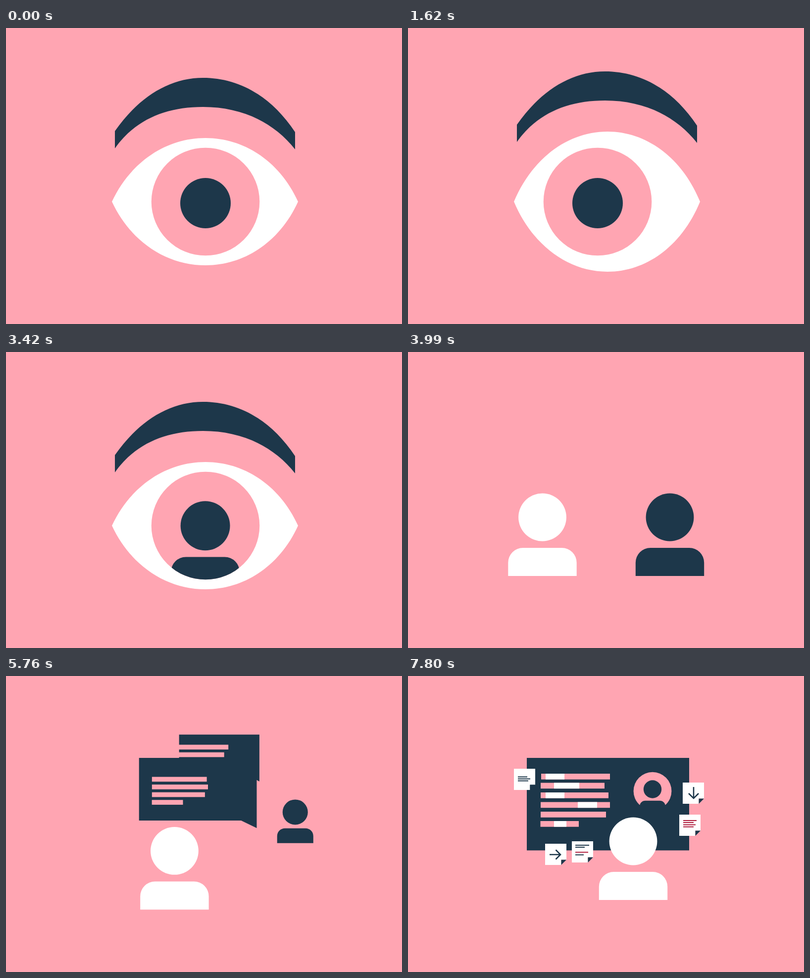
Recreate the animation shown at these times as an HTML page. Size 800 by 600 pixels, loop 8 s.

```html
<!DOCTYPE html>
<html lang="en">
<head>
<meta charset="utf-8">
<title>Eye, chat, profile</title>
<style>
  html, body { margin: 0; width: 100%; height: 100%; overflow: hidden; background: #ffa5b2; }
  svg { display: block; width: 100vw; height: 100vh; }
  .pink { fill: #ffa5b2; }
  .dark { fill: #1d374a; }
  .white { fill: #fff; }
  .ink { fill: none; stroke: #1d374a; stroke-width: 2; }
  .red { fill: none; stroke: #b01c3c; stroke-width: 2; }
  .arrow { stroke-width: 2.6; }
</style>
</head>
<body>
<svg viewBox="0 0 800 600">
  <defs>
    <clipPath id="lens"><circle id="lensCircle" cx="403" cy="352" r="109.3"/></clipPath>
    <g id="person">
      <circle r="48.4"/>
      <path d="M-69.2 119V92A30 30 0 0 1 -39.2 62H39.2A30 30 0 0 1 69.2 92V119Z"/>
    </g>
  </defs>
  <g id="eye">
    <path id="ball" class="white"/>
    <circle id="iris" class="pink" cy="352" r="109.3"/>
    <path id="brow" class="dark" d="M220 209C268 140 330 101 398 101S533 134 584 211V246C540 190 475 160 398 160S260 187 220 244Z"/>
  </g>
  <g id="pupil" class="dark" clip-path="url(#lens)">
    <circle id="head"/>
    <path id="torso" d="M-69.2 57V30A30 30 0 0 1 -39.2 0H39.2A30 30 0 0 1 69.2 30V57Z"/>
  </g>
  <g id="chat"></g>
  <g id="marks" class="white"></g>
  <circle id="badge" class="pink"/>
  <use id="guest" class="dark" href="#person"/>
  <use id="host" class="white" href="#person"/>
  <use id="twin" class="dark" href="#person"/>
  <g id="notes"></g>
</svg>
<script>
const LOOP = 8000;
const $ = id => document.getElementById(id);
const clamp = v => Math.min(1, Math.max(0, v));
const span = (t, a, b) => clamp((t - a) / (b - a));
const smooth = p => p * p * (3 - 2 * p);
const ease = (t, a, b) => smooth(span(t, a, b));
const out = p => 1 - (1 - p) ** 3;
const mix = (a, b, p) => a + (b - a) * p;
const back = (p, s) => 1 + (s + 1) * (p - 1) ** 3 + s * (p - 1) ** 2;

function add(parent, tag, attrs) {
  const el = document.createElementNS('http://www.w3.org/2000/svg', tag);
  set(el, attrs);
  return parent.appendChild(el);
}
function set(el, attrs) {
  for (const k in attrs) el.setAttribute(k, attrs[k]);
}
function show(el, on) {
  el.style.display = on ? '' : 'none';
}
function place(el, x, y, s = 1) {
  el.setAttribute('transform', `translate(${x} ${y}) scale(${s})`);
}
function scaleAt(el, x, y, s) {
  el.setAttribute('transform', `translate(${x} ${y}) scale(${s}) translate(${-x} ${-y})`);
}

// Bubble shapes: left, top, right, bottom, tail x, tail y
const bubbles = [
  { from: [286, 166, 469.5, 256.5, 436, 281], to: [240, 166, 568, 353.5, 540, 353.5], start: 4170, len: 330 },
  { from: [361.5, 85, 501, 143, 479, 162], to: [330, 175, 530, 300, 510, 300], start: 4650, len: 360 }
];
// Text bars: left, right, top before and after the merge
const bars = [
  { b: 1, from: [378, 474, 104], to: [269, 408, 198] },
  { b: 1, from: [378, 467, 117.5], to: [268, 397, 216.5] },
  { b: 0, from: [311, 406, 185.5], to: [268, 405, 236] },
  { b: 0, from: [311, 408, 198.7], to: [268, 408, 255.5] },
  { b: 0, from: [311, 403, 212], to: [268, 400, 275] },
  { b: 0, from: [311, 365, 225.5], to: [267.5, 345, 294] }
];
const marks = [[278, 316, 0], [295, 346, 1], [278, 316, 2], [343, 382, 3], [295, 320, 5]];
const notes = [
  { x: 214, y: 188, ink: 'M8 16.5h19M8 20.5h25M8 24.5h21' },
  { x: 555, y: 216, ink: 'M22 9v23M12 22l10 10 10-10', arrow: true },
  { x: 548, y: 281, red: 'M8 12h27M8 16h21M8 20.5h25M8 24.7h21' },
  { x: 331, y: 335, ink: 'M7 8h28M7 12h19M7 27.5h17', red: 'M7 22.3h26' },
  { x: 277, y: 340, ink: 'M9 22h22M21.5 12.5l9.5 9.5-9.5 9.5', arrow: true }
];

for (const b of bubbles) b.el = add($('chat'), 'path', { class: 'dark' });
for (const b of bars) b.el = add($('chat'), 'rect', { class: 'pink' });
for (const m of marks) m.el = add($('marks'), 'rect', { x: m[0], y: bars[m[2]].to[2], height: 11.7 });
for (const n of notes) {
  n.el = add($('notes'), 'g', {});
  add(n.el, 'path', { class: 'white', d: 'M0 0H43V32.5H32.5V43H0Z' });
  add(n.el, 'path', { class: 'dark', d: 'M32.5 32.5H43L32.5 43Z' });
  if (n.ink) add(n.el, 'path', { class: n.arrow ? 'ink arrow' : 'ink', d: n.ink });
  if (n.red) add(n.el, 'path', { class: 'red', d: n.red });
}

function drawEye(t) {
  const wide = ease(t, 0, 120) - ease(t, 2160, 2490);
  const look = -20 * ease(t, 900, 1140) + 40 * ease(t, 1710, 1950) - 20 * ease(t, 2160, 2490);
  const shrink = 1 - ease(t, 3450, 3640);
  const h = 129 + 13 * wide, k = h * 0.62;
  const half = s => `C251 ${352 + s * k} 323 ${352 + s * h} 403 ${352 + s * h}S554 ${352 + s * k} 590 352`;
  $('ball').setAttribute('d', `M214 352${half(-1)}M214 352${half(1)}`);
  $('iris').setAttribute('cx', 403 + look);
  $('brow').setAttribute('transform', `translate(0 ${-13 * wide})`);
  scaleAt($('eye'), 403, 352, shrink);
  show($('eye'), shrink > 0);

  const rise = ease(t, 3330, 3720);
  const x = mix(403, 400, rise) + look, y = mix(355, 335, rise);
  set($('lensCircle'), { cx: 403 + look, r: 109.3 + 160 * ease(t, 3440, 3580) });
  set($('head'), { cx: x, cy: y, r: mix(51, 48.4, ease(t, 3330, 3540)) });
  place($('torso'), x, y + mix(120, 63, out(span(t, 3330, 3440))));
  show($('pupil'), t < 3690);
}

function drawPeople(t, p) {
  const split = t < 3860 ? 139 * ease(t, 3640, 3860) : mix(139, 129, ease(t, 3860, 3980));
  const arc = Math.sin(Math.PI * p);
  const beside = t >= 3640;
  show($('host'), beside);
  place($('host'), mix(400 - split + 0.5, 455, p), 335 + 21 * arc);

  show($('guest'), t >= 3690);
  show($('twin'), beside && t < 3690);
  place($('twin'), 400 + split, 335);
  const s = mix(1, 0.376, out(p));
  const x = mix(400 + split, 494, p) + 74 * arc;
  const y = mix(335, 229.5, p) - 21 * arc;
  place($('guest'), x, y, s);
  set($('badge'), { cx: x, cy: y + 3.7 * p, r: 38.4 * p });
}

function drawChat(t, p) {
  for (const b of bubbles) {
    const [l, top, r, bottom, tx, ty] = b.from.map((v, i) => mix(v, b.to[i], p));
    b.size = Math.max(0, back(span(t, b.start, b.start + b.len), 1.35));
    if (t < b.start) b.size = 0;
    b.el.setAttribute('d', `M${l} ${top}H${r}V${ty}L${tx} ${bottom}H${l}Z`);
    scaleAt(b.el, b.from[2], b.from[5], b.size);
  }
  for (const bar of bars) {
    const [l, r, y] = bar.from.map((v, i) => mix(v, bar.to[i], p));
    const b = bubbles[bar.b];
    set(bar.el, { x: l, y, width: r - l, height: mix(8.5, 11.7, p) });
    scaleAt(bar.el, b.from[2], b.from[5], b.size);
  }
  show($('chat'), t >= bubbles[0].start);
}

function drawDetails(t) {
  notes.forEach((n, i) => {
    const a = 6425 + i * 42;
    const s = t <= a ? 0 : Math.max(0, back(span(t, a, a + 190), 1.7));
    n.el.setAttribute('transform', `translate(${n.x + 21.5} ${n.y + 21.5}) scale(${s}) translate(-21.5 -21.5)`);
    show(n.el, s > 0);
  });
  marks.forEach((m, i) => {
    const a = 7090 + i * 100;
    m.el.setAttribute('width', (m[1] - m[0]) * ease(t, a, a + 130));
  });
}

function draw(t) {
  const merge = span(t, 5545, 6120);
  drawEye(t);
  drawChat(t, merge);
  drawPeople(t, merge);
  drawDetails(t);
}

const begin = performance.now();
function tick() {
  draw((performance.now() - begin) % LOOP);
  requestAnimationFrame(tick);
}
tick();
</script>
</body>
</html>
```
